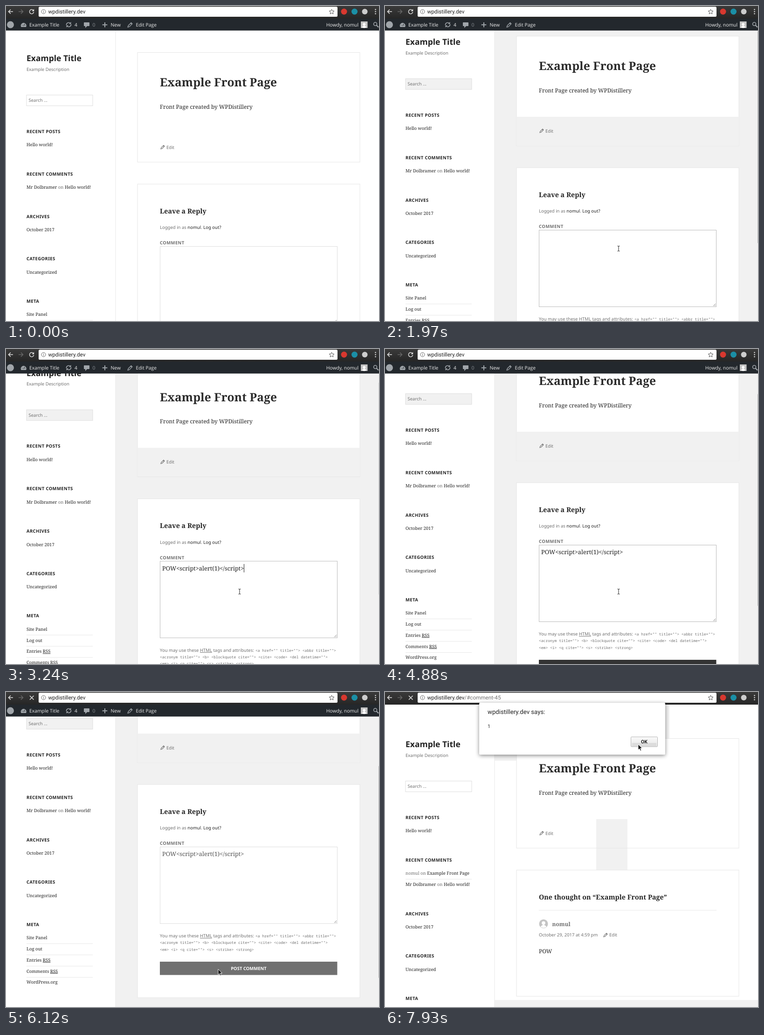
Animation of 800x674 px, one loop 8 s. Source, as an HTML page:

```html
<!DOCTYPE html>
<html lang="en">
<head>
<meta charset="utf-8">
<title>Comment form</title>
<style>
html, body { margin: 0; width: 100%; height: 100%; overflow: hidden; background: #fff; }
svg { display: block; width: 800px; height: 674px; }
text { font: 9.52px "Noto Sans", sans-serif; fill: #222; white-space: pre; text-rendering: geometricPrecision; }
.dim { fill: #707070; }
.head { font-weight: 700; letter-spacing: .04em; }
.site { font-size: 17.5px; font-weight: 700; }
.serif { font-family: "Noto Serif", serif; }
.body { font: 11.94px "Noto Serif", serif; }
.sub { font: 700 14.3px "Noto Serif", serif; }
.big { font: 700 24.7px "Noto Serif", serif; fill: #2b2b2b; }
.typed { font: 12.74px "Noto Serif", serif; }
.code { font: 8px "Noto Sans Mono", monospace; fill: #707070; }
.bar { font: 500 10.35px "Open Sans", sans-serif; fill: #eee; }
.ui { font: 11.7px Roboto, sans-serif; fill: #222; }
.abbr { text-decoration: underline dotted; }
.card { fill: none; stroke: #e6e6e6; }
.foot { fill: none; }
.field { fill: #fff; stroke: #dedede; }
.rule { fill: #e8e8e8; }
.gray .card { fill: #fff; }
.gray .foot, .gray #search { fill: #f1f1f1; }
.focus #area { stroke: #bbb; }
.line { fill: none; stroke-width: 1.6; }
</style>
</head>
<body>
<svg id="stage" viewBox="0 0 800 674"></svg>
<script>
const stage = document.getElementById('stage');
const user = 'nomul', guest = 'Mr Dolbramer';

const esc = s => s.replace(/</g, '&lt;');
const text = (x, y, s, cls = '', more = '') => `<text x="${x}" y="${y}" class="${cls}" ${more}>${s}</text>`;
const rect = (x, y, w, h, fill, more = '') =>
  `<rect x="${x}" y="${y}" width="${w}" height="${h}" ${fill ? `fill="${fill}"` : ''} ${more}/>`;
const box = (x, y, w, h, cls, id = '') => rect(x, y, w, h, '', `class="${cls}" id="${id}"`);
const dot = (x, y, r, fill) => `<circle cx="${x}" cy="${y}" r="${r}" fill="${fill}"/>`;
const path = (d, stroke, more = '') => `<path class="line" d="${d}" stroke="${stroke}" ${more}/>`;
const group = (id, inner) => `<g id="${id}">${inner}</g>`;
const dim = s => `<tspan class="dim">${s}</tspan>`;
const rss = s => s.replace('RSS', '<tspan class="abbr">RSS</tspan>');
const pen = (x, y, c, k = 1) =>
  path('M-4 4l1-3 5-5 2 2-5 5zM1-3l2 2', c, `transform="translate(${x} ${y}) scale(${k})" style="stroke-width:1.1"`);
const person = (x, y, r) => dot(x, y - r * .2, r * .42, '#fff') +
  `<path d="M${x - r * .7} ${y + r * .72}q${r * .7} ${-r} ${r * 1.4} 0q${-r * .7} ${r * .5} ${-r * 1.4} 0z" fill="#fff"/>`;

// Sidebar widgets: a heading, then rows 24px apart with rules between.
function widget(y, title, rows) {
  return text(44, y + 3.5, title, 'head') + rows.map((row, i) =>
    text(44, y + 32.2 + i * 23.8, row, 'serif') +
    (i < rows.length - 1 ? box(44, Math.round(y + 41 + i * 24), 142, 1, 'rule') : '')).join('');
}

function sidebar(id, comments) {
  const shift = 24 * (comments.length - 1);
  return group(id,
    text(44, 118, 'Example Title', 'site') +
    text(44, 138.5, 'Example Description', 'dim') +
    box(44, 190.5, 142, 23, 'field', id === 'side' ? 'search' : '') +
    text(48.5, 205.3, 'Search ...', 'dim') +
    widget(268, 'RECENT POSTS', ['Hello world!']) +
    widget(359, 'RECENT COMMENTS', comments) +
    widget(450 + shift, 'ARCHIVES', ['October 2017']) +
    widget(540.5 + shift, 'CATEGORIES', ['Uncategorized']) +
    widget(631 + shift, 'META',
      ['Site Panel', 'Log out', rss('Entries RSS'), rss('Comments RSS'), 'WordPress.org']));
}

const post =
  box(282, 99.5, 477, 234.5, 'card') + box(282.5, 272, 476, 61.5, 'foot') +
  text(330, 172, 'Example Front Page', 'big') +
  text(330, 219.7, 'Front Page created by WPDistillery', 'body') +
  pen(336, 302, '#707070') + text(344, 305.7, 'Edit', 'dim');

const form =
  box(282, 381, 477, 456, 'card') +
  text(330, 443.5, 'Leave a Reply', 'sub') +
  text(330, 477.3, `${dim('Logged in as ')}${user}${dim('.')} Log out?`) +
  text(330, 510.4, 'COMMENT', 'head dim') +
  box(330.5, 514.5, 380, 164, 'field', 'area') +
  path('M704 677l5-5M707 677l2-2', '#888', 'style="stroke-width:1"') +
  text(335, 534.2, esc('POW<script>alert(1)<\/script>'), 'typed', 'id="typed"') +
  rect(0, 520.5, 1, 18, '#222', 'id="caret"') +
  text(330, 708.3, 'You may use these <tspan class="abbr">HTML</tspan> tags and attributes:', 'dim') +
  text(535, 708, esc('<a href="" title=""> <abbr title="">'), 'code') +
  text(330, 722.4, esc('<acronym title=""> <b> <blockquote cite=""> <cite> <code> <del datetime="">'), 'code') +
  text(330, 736.6, esc('<em> <i> <q cite=""> <s> <strike> <strong>'), 'code') +
  rect(330, 760, 380.5, 28.5, '#333', 'id="button"') +
  text(520.5, 777.5, 'POST COMMENT', '', 'text-anchor="middle" style="fill:#fff;font-weight:700"');

const thread =
  box(282, 381, 477, 270, 'card') +
  text(330, 443.5, 'One thought on “Example Front Page”', 'sub') +
  box(330, 466.5, 381, 1, 'rule') +
  dot(340, 496, 9.5, '#c4c4c4') + person(340, 496, 9) +
  text(358.5, 500.7, user, 'body dim', 'style="font-weight:700"') +
  text(330, 523.3, 'October 29, 2017 at 4:59 pm', 'dim') +
  pen(473, 520, '#707070') + text(481, 523.3, 'Edit', 'dim') +
  text(330, 559, 'POW', 'body');

const reload = (x, y, c) =>
  path(`M${x + 3.6} ${y - 2.8}a4.6 4.6 0 1 0 1 3.6`, c) +
  `<path d="M${x + 5.2} ${y - 5.5}v4.8h-4.8z" fill="${c}"/>`;

const chrome =
  rect(0, 0, 800, 27, 'url(#dark)') +
  path('M15 12H6M10 7.5L5.5 12l4.5 4.5', '#ddd') +
  path('M27 12h9M32 7.5l4.5 4.5-4.5 4.5', '#666') +
  group('reload', reload(55, 12, '#ddd')) +
  group('stop', path('M51 8l8.5 8.5M59.5 8L51 16.5', '#ddd')) +
  rect(70, 1.5, 641, 21.5, '#fff', 'rx="2.5"') +
  '<circle cx="80.5" cy="12" r="4.5" class="line" stroke="#666" style="stroke-width:1"/>' +
  path('M80.5 11.5v3M80.5 9.2v1.2', '#666', 'style="stroke-width:1.1"') +
  text(90.5, 16, 'wpdistillery.dev<tspan id="hash" class="dim">/#comment-45</tspan>', 'ui') +
  path('M698.5 7l1.6 3.4 3.7.4-2.8 2.5.8 3.7-3.3-1.9-3.3 1.9.8-3.7-2.8-2.5 3.7-.4z', '#555', 'style="stroke-width:1"') +
  dot(725, 12, 6.5, '#d8382f') + dot(747.5, 12, 6.5, '#1b8fa6') + dot(769.5, 12, 6, '#ccc') +
  [7.5, 12, 16.5].map(y => dot(792.5, y, 1.3, '#ddd')).join('');

const adminBar =
  rect(0, 26.5, 800, 26, '#23282d') +
  dot(9.5, 40, 7.5, '#a0a5aa') +
  '<path d="M32.5 45a6 6 0 1 1 10.5 0z" fill="#a0a5aa"/>' +
  path('M37.5 43l2.5-5M34 41h1.5M40 41h1.5', '#23282d', 'style="stroke-width:1"') +
  text(50, 43.7, 'Example Title', 'bar') +
  path('M129.5 41a5 5 0 0 1 8.5-4M139.5 39a5 5 0 0 1-8.5 4', '#a0a5aa') +
  '<path d="M139.5 34v4.5h-4.5zM129.5 46v-4.5h4.5z" fill="#a0a5aa"/>' +
  text(147, 43.7, '4', 'bar') +
  '<path d="M168 35h10q1 0 1 1v6q0 1-1 1h-4l-4 4v-4h-2q-1 0-1-1v-6q0-1 1-1z" fill="#a0a5aa"/>' +
  text(185.5, 43.7, '0', 'bar', 'style="fill:#8a8f94"') +
  path('M212 35v10.5M206.7 40.2h10.6', '#a0a5aa', 'style="stroke-width:2"') +
  text(224.5, 43.7, 'New', 'bar') +
  pen(266, 40.5, '#a0a5aa', 1.2) + text(278.5, 43.7, 'Edit Page', 'bar') +
  text(756, 43.7, 'Howdy, ' + user, 'bar', 'text-anchor="end"') +
  rect(761, 33, 14.5, 14, '#c4c4c4') + person(768.2, 40.5, 7) +
  '<circle cx="792" cy="38.5" r="3.5" class="line" stroke="#a0a5aa"/>' +
  path('M794.5 41l4.5 4.5', '#a0a5aa', 'style="stroke-width:2.2"');

const dialog =
  rect(202, 23, 399, 111, '#fff', 'rx="2" style="filter:drop-shadow(0 2px 4px #0007)"') +
  text(220, 47, 'wpdistillery.dev says:', 'ui', 'style="font-size:13.2px"') +
  text(220, 77, '1', 'ui', 'style="font-size:10.5px"') +
  rect(527.5, 96, 57, 21, 'url(#light)', 'stroke="#b4b4b4" rx="1.5"') +
  rect(530, 109, 52, 7, '#dcdcdc', 'id="press"') +
  text(556, 110.3, 'OK', 'ui', 'id="ok" text-anchor="middle" style="font-size:10.5px"');

const gradient = (id, a, b) =>
  `<linearGradient id="${id}" x2="0" y2="1"><stop stop-color="${a}"/><stop offset="1" stop-color="${b}"/></linearGradient>`;
const shade = '#f1f1f1';

stage.innerHTML =
  `<defs>${gradient('dark', '#3a3a3a', '#262626')}${gradient('light', '#fafafa', '#e6e6e6')}</defs>` +
  group('ground', rect(235, 27, 565, 647, shade)) +
  group('patchA', rect(235, 88, 374, 60, shade) + rect(760, 52, 40, 37, shade) +
    rect(235, 495, 47, 179, shade) + rect(235, 655, 565, 19, shade)) +
  group('patchB', rect(235, 134, 47, 13, shade) + rect(601, 27, 9, 73, shade) + rect(235, 659, 565, 15, shade)) +
  group('trail', rect(453, 272, 67, 109, shade)) +
  rect(234.5, 27, 1, 647, '#e8e8e8') +
  sidebar('side', [guest + dim(' on ') + 'Hello world!']) +
  group('main', post + form) +
  group('fresh', sidebar('side2', [dim(user + ' on ') + 'Example Front Page', guest + dim(' on ') + 'Hello world!']) +
    post + thread) +
  rect(799, 0, 1, 453, '#b4b4b4', 'id="thumb"') +
  group('adminBar', adminBar) + chrome + group('dialog', dialog) +
  group('beam', path('M-2.5-5.5q2 0 2.5 1q.5-1 2.5-1M0-4.5v9M-2.5 5.5q2 0 2.5-1q.5 1 2.5 1', '#333', 'style="stroke-width:1.1"')) +
  group('arrow', '<path d="M0 0v12l2.8-2.6 2 4.6 2-.9-2-4.5h3.9z" fill="#111" stroke="#fff" stroke-width=".9"/>');

const el = id => document.getElementById(id);
const show = (id, on) => { el(id).style.display = on ? '' : 'none'; };
const move = (id, x, y) => el(id).setAttribute('transform', `translate(${x} ${y})`);
const latest = (keys, t) => keys.filter(k => k[0] <= t).pop();

// [time, scroll] and [time, x, y]; each value holds until the next.
const scrolls = [[0, 0], [1970, 35], [2130, 50], [2290, 57], [2450, 60], [2620, 60.5],
  [4730, 70], [4880, 95], [5040, 145], [5210, 182], [5360, 183]];
const pointer = [[0, -50, -50], [600, 501, 560], [770, 501, 519], [5360, 480, 560], [5510, 455, 593],
  [7490, 510, 178], [7630, 522, 150], [7780, 535, 125], [7930, 543, 112]];

function draw() {
  const t = performance.now() % 8000;
  const within = (a, b) => t >= a && t < b;
  const scroll = latest(scrolls, t)[1];
  const [, x, y] = latest(pointer, t);
  const gray = within(1970, 6570), alerted = t >= 6570, fresh = t >= 7180, pasted = t >= 3240;

  stage.classList.toggle('gray', gray);
  stage.classList.toggle('focus', within(1070, 6120));
  show('ground', gray);
  show('patchA', alerted && !fresh);
  show('patchB', fresh);
  show('trail', t >= 7490);
  for (const id of ['side', 'main', 'adminBar']) show(id, !fresh);
  show('fresh', fresh);
  move('side', 0, -Math.min(scroll, 134));
  move('main', 0, -scroll);

  show('typed', pasted);
  el('typed').style.fill = t < 6120 ? '#222' : '#555';
  show('caret', within(1070, 1520) || within(3240, 3680) || within(4130, 4730) || within(5040, 5480));
  el('caret').setAttribute('x', pasted ? Math.floor(335 + typedWidth) : 336);
  el('button').setAttribute('fill', t < 5510 ? '#333' : '#707070');

  show('thumb', within(1970, 3390) || within(4730, 7180));
  el('thumb').setAttribute('y', 29.5 + .705 * scroll);
  el('thumb').style.opacity = within(3060, 3390) ? .5 : 1;
  show('reload', t < 6120);
  show('stop', t >= 6120);
  show('hash', alerted);
  show('dialog', alerted);
  el('ok').style.fontWeight = t < 7490 ? 400 : 700;
  show('press', t >= 7930);

  show('beam', t < 5360);
  show('arrow', t >= 5360);
  move('beam', x, y);
  move('arrow', x, y);
  requestAnimationFrame(draw);
}

const typedWidth = el('typed').getComputedTextLength();
draw();
</script>
</body>
</html>
```
